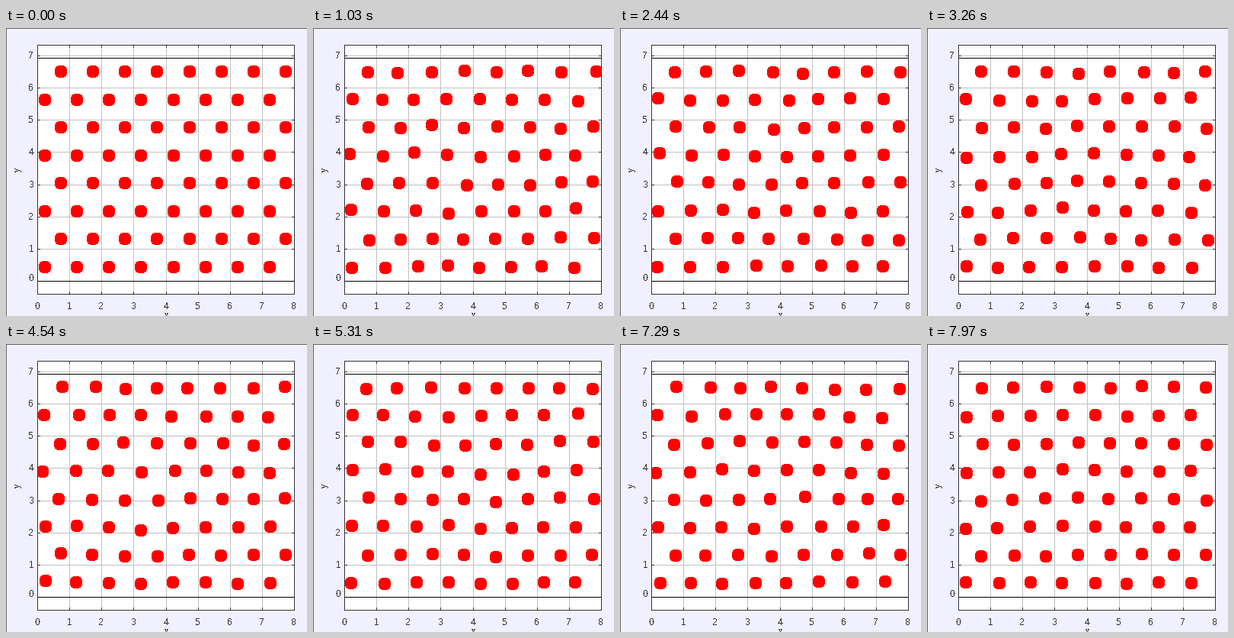
A matplotlib script for the animation above (8 s loop, 395 by 377 pixels).

```python
import numpy as np
import matplotlib.pyplot as plt
from matplotlib.animation import FuncAnimation
from matplotlib.collections import LineCollection
from matplotlib.patches import Rectangle

plt.rcParams.update({"text.hinting": "native", "text.hinting_factor": 1})

W, H, DPI = 395, 377, 64
PX = 72 / DPI                      # points per pixel
LOOP, TICK = 8000, 20
N = 8
X0, Y0, UNIT = 41, 331, 42.125     # plot origin and scale in pixels
LEFT, RIGHT, TOP, BOTTOM = 41, 378, 22, 348
INK = "#333333"

# (first change, last change, number of changes) in ms
BURSTS = [(750, 1700, 8), (1850, 2840, 8), (2960, 3890, 8), (4040, 5040, 9),
          (5190, 6180, 8), (6300, 7290, 8), (7440, 7970, 5)]
STEP_TIMES = np.concatenate([np.linspace(*b) for b in BURSTS])


def lattice():
    """Triangular lattice, alternate rows shifted by half a spacing."""
    row, col = np.divmod(np.arange(N * N), N)
    return np.column_stack([col + 0.25 + 0.5 * (row % 2),
                            (row + 0.5) * np.sqrt(3) / 2])


def vibrate(home, steps, substeps=10, dt=0.04, rms=1.4):
    """Displacements in pixels of a spring crystal between two walls."""
    gap = home[None] - home[:, None]
    gap[..., 0] -= N * np.round(gap[..., 0] / N)
    dist = np.hypot(gap[..., 0], gap[..., 1])
    bond = (dist > 0.1) & (dist < 1.1)
    n = gap * (bond / np.where(bond, dist, 1))[..., None]
    edge = (home[:, 1] < 0.5) | (home[:, 1] > 6.4)

    rng = np.random.default_rng(12)
    v = rng.normal(size=home.shape)
    v -= v.mean(axis=0)
    u = np.zeros_like(home)
    path = [u.copy()]
    for _ in range(steps):
        for _ in range(substeps):
            stretch = ((u[None] - u[:, None]) * n).sum(axis=2)
            force = (stretch[..., None] * n).sum(axis=1)
            force[edge, 1] -= 2 * u[edge, 1]
            v += dt * force
            u = u + dt * v
        path.append(u.copy())
    path = np.array(path)
    path *= rms / path[4:].std()
    path[:, edge, 1] = np.clip(path[:, edge, 1], -3, 3)
    return np.clip(path, -5, 5)


HOME = lattice()
PATH = vibrate(HOME, len(STEP_TIMES))
CENTRE = np.column_stack([X0 + UNIT * HOME[:, 0],
                          Y0 + 0.5 - UNIT * HOME[:, 1]])

fig = plt.figure(figsize=(W / DPI, H / DPI), dpi=DPI, facecolor="#f0f0ff")
ax = fig.add_axes([0, 0, 1, 1])
ax.axis("off")


def lines(segments, color, z):
    """Crisp one-pixel lines through pixel centres."""
    rows = LineCollection(np.array(segments) + 0.5, colors=color,
                          linewidths=PX, antialiaseds=False,
                          capstyle="projecting", zorder=z)
    rows.set_snap(False)
    ax.add_collection(rows, autolim=False)


def label(x, y, s, **kw):
    ax.text(x, y, s, family="Liberation Sans", size=12 * PX, color=INK,
            antialiased=False, **kw)


ax.add_patch(Rectangle((LEFT, TOP), RIGHT - LEFT, BOTTOM - TOP,
                       color="white", lw=0, zorder=0))
lines([[(0, 0), (W, 0)], [(0, 0), (0, H)]], "#646464", 1)

xs = [round(X0 + UNIT * k) for k in range(9)]
ys = [round(Y0 - UNIT * k) for k in range(8)]
lines([[(x, TOP), (x, BOTTOM)] for x in xs]
      + [[(LEFT, y), (RIGHT, y)] for y in ys], "#c0c0c0", 1)

ticks = []
for x in xs:
    ticks += [[(x, TOP), (x, TOP + 3)], [(x, BOTTOM - 3), (x, BOTTOM)]]
for y in ys:
    ticks += [[(LEFT, y), (LEFT + 3, y)], [(RIGHT - 3, y), (RIGHT, y)]]
lines(ticks, INK, 2)

top_wall = round(Y0 - UNIT * N * np.sqrt(3) / 2)
lines([[(LEFT, y), (RIGHT, y)] for y in (top_wall, Y0)], "black", 3)
lines([[(LEFT, TOP), (RIGHT, TOP)], [(LEFT, BOTTOM), (RIGHT, BOTTOM)],
       [(LEFT, TOP), (LEFT, BOTTOM)], [(RIGHT, TOP), (RIGHT, BOTTOM)]], INK, 5)

for k, x in enumerate(xs):
    label(x, 368, str(k), ha="center", va="baseline")
for k, y in enumerate(ys):
    label(36.5, y + (4 if k else 0), str(k), ha="right", va="baseline")
label(210, 380, "x", ha="center", va="baseline")
label(15.5, 185.5, "y", rotation=90, ha="center", va="center")

# one size per dot keeps the edges free of smoothing
dots = ax.scatter(*CENTRE.T, s=np.full(N * N, (16 * PX) ** 2), c="red",
                  linewidths=0, antialiased=False, zorder=4)
dots.set_snap(False)
dots.set_clip_path(Rectangle((LEFT + 1, TOP + 1), RIGHT - LEFT - 1,
                             BOTTOM - TOP - 1, transform=ax.transData))
ax.set(xlim=(0, W), ylim=(H, 0))


def draw(i):
    t = (i + 0.5) * TICK
    step = np.searchsorted(STEP_TIMES, t + 1e-6, side="right")
    dots.set_offsets(np.floor(CENTRE + PATH[step]))
    return dots,


anim = FuncAnimation(fig, draw, frames=LOOP // TICK, interval=TICK,
                     repeat=True, repeat_delay=0)
plt.show()
```
